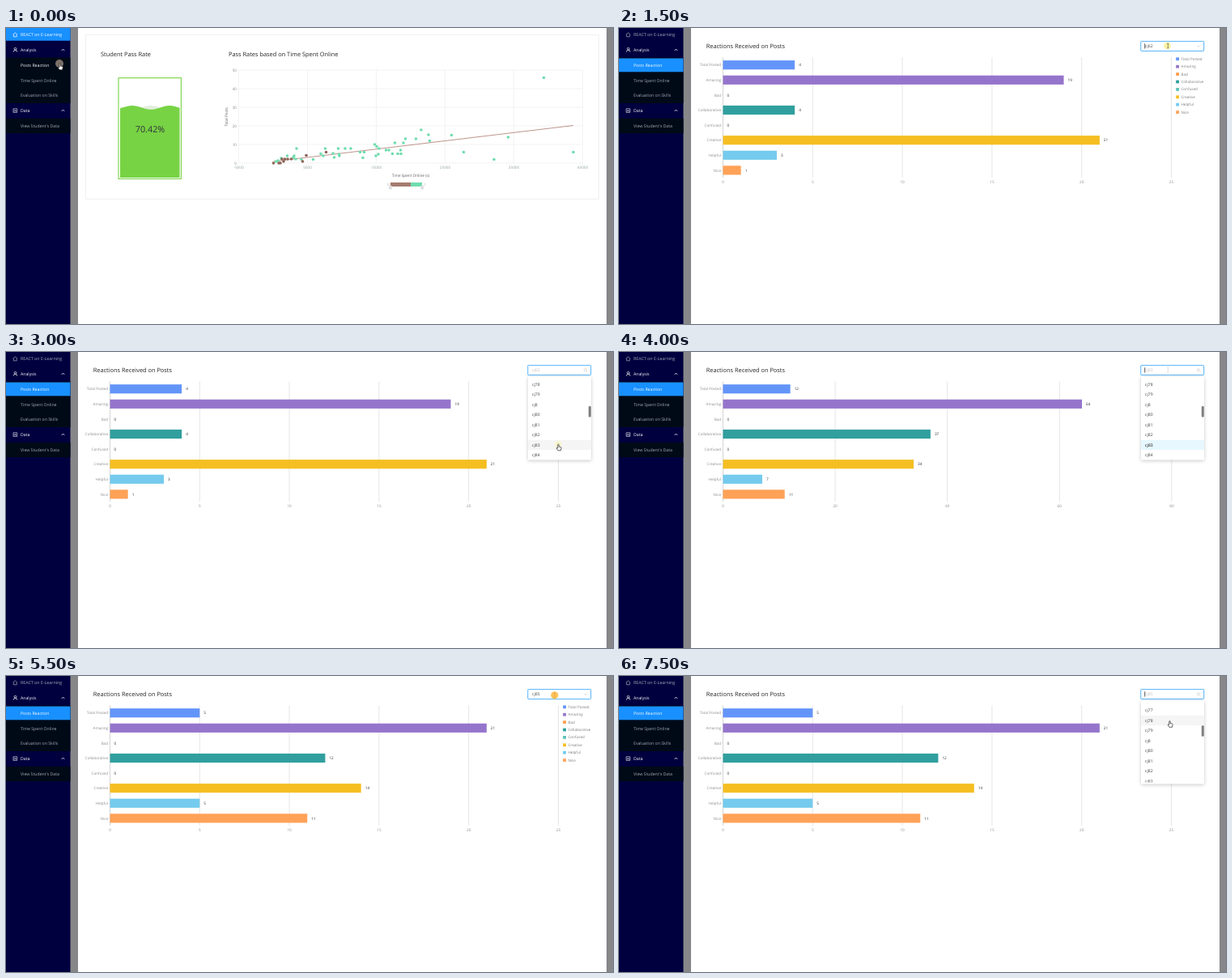
Write an HTML page that moves like this. It is 750 px wide and 366 px high and loops after 8 s.

```html
<!DOCTYPE html>
<html lang="en">
<head>
<meta charset="utf-8">
<title>Learning dashboard</title>
<style>
html, body { margin: 0; width: 100%; height: 100%; overflow: hidden; background: #fff; }
svg { display: block; width: 750px; height: 366px; }
text { font-family: "Open Sans", "Noto Sans", sans-serif; text-rendering: geometricPrecision; white-space: pre; }
.panel { filter: drop-shadow(0 1.5px 2px rgba(0, 0, 0, .22)); }
</style>
</head>
<body>
<svg id="stage" viewBox="0 0 750 366">
  <defs><clipPath id="listClip"><rect x="645" y="33" width="78" height="98.5"/></clipPath></defs>
  <g id="view"></g>
</svg>
<script>
const view = document.getElementById('view');

const rect = (x, y, w, h, fill, more = '') =>
  `<rect x="${x}" y="${y}" width="${w}" height="${h}" fill="${fill}" ${more}/>`;
const line = (x1, y1, x2, y2, color, w = 1) =>
  `<path d="M${x1} ${y1}L${x2} ${y2}" stroke="${color}" stroke-width="${w}"/>`;
const dot = (x, y, r, fill, more = '') => `<circle cx="${x}" cy="${y}" r="${r}" fill="${fill}" ${more}/>`;
const outline = (d, color, w = .7) => `<path d="${d}" fill="none" stroke="${color}" stroke-width="${w}"/>`;
const text = (x, y, s, size, fill, anchor = 'start', more = '') =>
  `<text x="${x}" y="${y + size * .35}" font-size="${size}" fill="${fill}" text-anchor="${anchor}" ${more}>${s}</text>`;
const bold = 'font-weight="500"';

// ---------- page frame and menu ----------
function sidebar(active) {
  const pale = '#a6adb4';
  const home = active === 0 ? '#fff' : pale;
  const caret = y => outline(`M68.8 ${y + .9}l1.7 -1.8l1.7 1.8`, '#fff', .8);
  const items = [['Posts Reaction', 45.8], ['Time Spent Online', 64.8], ['Evaluation on Skills', 83.5], ["View Student's Data", 121]];
  return rect(0, 0, 750, 366, '#87878a') + rect(89, 0, 653, 366, '#fff') +
    rect(0, 0, 79.5, 366, '#00003f') +
    rect(0, 36.5, 79.5, 56.5, '#000a17') + rect(0, 111.8, 79.5, 18.4, '#000a17') +
    (active === 0 ? rect(0, 0, 79.5, 15.7, '#1890ff') : rect(0, 37.5, 79.5, 16.8, '#1890ff')) +
    outline('M8.7 8.2l2.6 -2.4l2.6 2.4M9.4 7.8v3h3.8v-3', home) +
    text(18, 8, 'REACT on E-Learning', 5.3, home) +
    outline('M9.3 29.6q0 -2.4 2.2 -2.4t2.2 2.4M10.1 25.8a1.4 1.4 0 1 0 2.8 0a1.4 1.4 0 1 0 -2.8 0', '#fff') +
    text(18, 27, 'Analysis', 5.2, '#fff', 'start', bold) + caret(27) +
    outline('M9 99.8h4.6v4.6h-4.6zM10.2 103.2v-1.4M11.4 103.2v-2.2M12.5 103.2v-1', '#fff', .6) +
    text(18, 102, 'Data', 5.2, '#fff', 'start', bold) + caret(102) +
    items.map(([s, y], i) => text(18, y, s, 5.2, i === 0 ? '#fff' : pale)).join('');
}

// ---------- pass rate page ----------
const passed = [333.5, 165, 336, 164, 340, 161, 347.5, 158, 355, 160, 356, 158, 358, 162, 359, 149, 365, 162.5,
  379.5, 162.5, 389, 155.5, 392, 158, 394.5, 149, 404, 155, 405.5, 160, 410.5, 149, 411.5, 156, 412, 158,
  419, 149, 426, 149, 437.5, 153.5, 442.5, 153.5, 441, 160.5, 455.5, 144, 458, 146.5, 461, 149, 457, 158,
  460, 156, 469.5, 151, 473, 151, 477.5, 155.5, 480.5, 142, 484, 155.5, 488, 155.5, 487.5, 151, 491, 142,
  493.5, 137, 506.5, 137, 513, 126, 522, 132, 523.5, 139.5, 550.5, 132.5, 565.5, 153.5, 603, 162.5,
  620.5, 135, 664.5, 61.5, 701, 153.5];
const failed = [330.5, 167, 337, 167, 339, 167, 343, 165, 341, 162, 344.5, 162, 348, 162, 352.5, 162,
  366.5, 165, 371, 157.5, 395.5, 153.5];
const dots = (list, color) =>
  list.map((x, i) => i % 2 ? '' : dot(x, list[i + 1], 1.8, color)).join('');

function wave(phase, color) {
  let d = 'M141 185';
  for (let x = 141; x <= 214.5; x += 1.5) d += `L${x} ${98.4 + 2.4 * Math.cos((x - phase) * Math.PI / 23)}`;
  return `<path d="${d}V185Z" fill="${color}"/>`;
}

function passPage() {
  const green = '#77d344', grey = '#8c8c8c', brown = '#8d6358', mint = '#6fdcae';
  let s = rect(98.5, 8.5, 634, 203, 'none', 'stroke="#f0f0f0"') +
    text(117, 32.2, 'Student Pass Rate', 7.4, '#262626', 'start', bold) +
    text(275, 32.2, 'Pass Rates based on Time Spent Online', 7.4, '#262626', 'start', bold) +
    rect(139, 61.7, 77.4, 124.8, '#fff', `stroke="${green}" stroke-width="1.1"`) +
    wave(156, '#e3eedd') + wave(179, green) +
    text(178, 125, '70.42%', 10.8, '#30303c', 'middle');
  for (let i = 0; i < 6; i++) {
    const x = 287.5 + 85 * i, y = 167 - 23 * i;
    s += line(287.5, y, 712.5, y, '#f0f0f0', .8) + line(x, 52, x, 167, '#f0f0f0', .8) +
      text(285, y, i * 10, 4.7, grey, 'end') +
      text(x, 172, i * 10000 - 5000, 4.7, '#8fa596', 'middle');
  }
  return s + text(0, 0, 'Total Posts', 4.7, '#595959', 'middle', 'transform="translate(272 110) rotate(-90)"') +
    text(500, 182, 'Time Spent Online (s)', 4.7, '#595959', 'middle') +
    line(330.5, 165, 701, 120.5, '#b5897d', .9) + dots(passed, mint) + dots(failed, brown) +
    rect(475, 191, 25, 5, '#a57b70') + rect(500, 191, 14, 5, mint) +
    rect(473.2, 195, 3.6, 4.5, '#dedede') + rect(512.4, 195, 3.6, 4.5, '#dedede') +
    text(472, 193.5, '0', 4.5, '#bbb', 'middle') + text(517.5, 193.5, '1', 4.5, '#bbb', 'middle');
}

// ---------- reactions page ----------
const kinds = ['Total Posted', 'Amazing', 'Bad', 'Collaborative', 'Confused', 'Creative', 'Helpful', 'Nice'];
const colors = ['#6395f9', '#9575cc', '#ff9d4d', '#309f9e', '#5fc2b6', '#f5bf22', '#74cbed', '#ffa257'];
// step = value per grid line, gap = pixels per grid line
const charts = {
  all: { step: 500, gap: 184, values: [391, 1346, 4, 807, 39, 1300, 286, 531] },
  first: { step: 5, gap: 110.8, values: [4, 19, 0, 4, 0, 21, 3, 1] },
  second: { step: 20, gap: 138.6, values: [12, 64, 0, 37, 0, 34, 7, 11] },
  third: { step: 5, gap: 110.8, values: [5, 21, 0, 12, 0, 14, 5, 11] }
};

function barChart({ step, gap, values }) {
  const left = 128.5;
  let s = text(107.7, 22.8, 'Reactions Received on Posts', 7.4, '#262626', 'start', bold);
  for (let x = left, n = 0; x < 684; x += gap, n += step)
    s += line(x, 36.5, x, 185, n ? '#e2e2e2' : '#d0d0d0', .9) + text(x, 190, n, 4.7, '#8c8c8c', 'middle');
  values.forEach((v, i) => {
    const y = 45.7 + 18.6 * i, w = v / step * gap;
    s += line(126.8, y, left, y, '#d0d0d0', .6) +
      text(126, y, kinds[i], 4.6, '#8c8c8c', 'end') +
      rect(left, y - 5.6, w, 11.2, colors[i]) +
      text(left + w + 5, y, v, 4.7, '#333');
  });
  kinds.forEach((k, i) => {
    const y = 38.3 + 9.4 * i;
    s += rect(688.2, y - 1.9, 3.8, 3.8, colors[i]) + text(694.5, y, k, 4.55, '#7c7c7c');
  });
  return s;
}

// Names in alphabetical order: 6, 60..69, 7, 70..79, ...
const names = ['All Students'];
for (const tens of [6, 7, 8, 9]) {
  names.push('cj' + tens);
  for (let i = 0; i < 10; i++) names.push(`cj${tens}${i}`);
}

function select({ pick, open, caret }) {
  return rect(643.6, 15.6, 80, 13.8, '#e3f2ff', 'rx="1.4"') +
    rect(644.8, 16.6, 77.8, 11.8, '#fff', 'stroke="#4fb0fa" stroke-width=".9" rx=".8"') +
    text(650, 22.5, names[pick], 5.1, open ? '#bfbfbf' : '#4a4a4a') +
    (caret ? line(649.7, 19.2, 649.7, 25.6, '#333', .8) : '') +
    (open ? outline('M714.2 22.2a1.6 1.6 0 1 0 3.2 0a1.6 1.6 0 1 0 -3.2 0M717 23.4l1.2 1.2', '#c4c4c4', .6)
          : outline('M714.4 21.6l1.7 1.8l1.7 -1.8', '#c4c4c4', .7));
}

function dropdown({ pick, top, hover, thumb }) {
  let rows = '';
  names.forEach((name, i) => {
    const y = 40 + (i - top) * 12.5;
    if (y < 25 || y > 140) return;
    const fill = i === pick ? '#e6f7ff' : i === hover ? '#f5f5f5' : '#fff';
    rows += rect(645, y - 6.25, 78, 12.5, fill) +
      text(650, y, name, 5.1, '#404040', 'start', i === pick ? 'font-weight="600"' : '');
  });
  return rect(645, 30.5, 78, 103, '#fff', 'class="panel" rx="1"') +
    `<g clip-path="url(#listClip)">${rows}</g>` + rect(719.8, thumb, 3, 13.5, '#7f7f7f', 'rx="1"');
}

// ---------- pointers ----------
const hand = (x, y) =>
  `<path transform="translate(${x} ${y})" d="M-1.2 -3.6q.7 -.8 1.3 0v2.6l2.4 .6q.8 .3 .6 1.2l-.7 3h-3.4l-2 -2.9q.3 -1 1.8 0z" fill="#fff" stroke="#222" stroke-width=".7"/>`;
const beam = (x, y, color = '#444') =>
  outline(`M${x - 1} ${y - 2.8}h2M${x} ${y - 2.8}v5.6M${x - 1} ${y + 2.8}h2`, color, .6);
const orange = (x, y) => dot(x, y, 4.6, '#ffc35c') + beam(x, y, '#d99a3a');
const yellow = (x, y, alpha = 1) => dot(x, y, 4.3, '#fbf3a0', `opacity="${alpha}"`);
const point = (x, y) => yellow(x - .8, y - 4, .45) + hand(x, y);

// ---------- one scene per half second ----------
const scenes = [
  { page: 'pass', mark: dot(66, 44, 5, '#7d7068') + hand(67.2, 48) },
  { chart: 'all', pick: 0, mark: orange(700.3, 21.2) },
  { chart: 'all', pick: 0, open: true, caret: true, top: 0, hover: 4, thumb: 34, mark: point(680, 92) },
  { chart: 'first', pick: 4, caret: true, mark: yellow(677.5, 22) + beam(678.3, 22) },
  { chart: 'first', pick: 4, open: true, caret: true, top: 0, thumb: 34, mark: beam(678.3, 23) },
  { chart: 'first', pick: 4, open: true, top: 12, hover: 18, thumb: 53, mark: point(683, 118) },
  { chart: 'first', pick: 4, open: true, top: 21, hover: 27, thumb: 67, mark: point(683, 118) },
  { chart: 'second', pick: 27, mark: yellow(677.5, 22) + beam(678.3, 22) },
  { chart: 'second', pick: 27, open: true, caret: true, top: 21, thumb: 67, mark: beam(678.3, 22, '#ccc') },
  { chart: 'second', pick: 27, open: true, top: 22.5, hover: 29, thumb: 69, mark: point(682, 123) },
  { chart: 'second', pick: 29, mark: beam(678.3, 24) },
  { chart: 'third', pick: 29, mark: orange(677.8, 23.8) },
  { chart: 'third', pick: 29, open: true, caret: true, top: 22.5, thumb: 69, mark: beam(678.3, 24) },
  { chart: 'third', pick: 29, open: true, caret: true, top: 21.6, hover: 23, thumb: 67, mark: point(681, 59.5) },
  { chart: 'third', pick: 29, open: true, top: 20.6, hover: 22, thumb: 64, mark: point(681, 59.5) },
  { chart: 'third', pick: 29, open: true, caret: true, top: 19.8, hover: 21, thumb: 61.3, mark: hand(681, 59.5) }
];

function draw(scene) {
  const isPass = scene.page === 'pass';
  const body = isPass ? passPage()
    : barChart(charts[scene.chart]) + select(scene) + (scene.open ? dropdown(scene) : '');
  view.innerHTML = sidebar(isPass ? 0 : 1) + body + scene.mark;
}

let shown = -1;
function tick() {
  const index = Math.floor(performance.now() % 8000 / 500);
  if (index !== shown) draw(scenes[shown = index]);
  requestAnimationFrame(tick);
}
tick();
</script>
</body>
</html>
```
